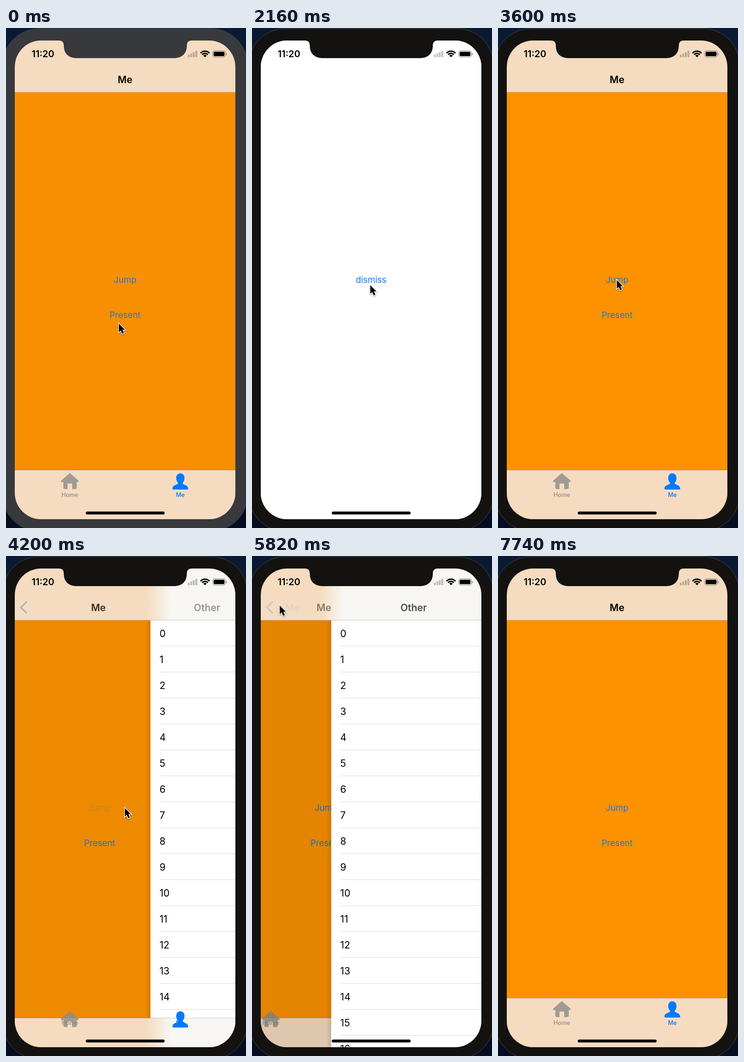
An HTML page with a canvas that plays this animation: 519x1079 px, repeating every 7800 ms.

```html
<!DOCTYPE html>
<html lang="en">
<head>
<meta charset="utf-8">
<style>
html, body { margin: 0; width: 100%; height: 100%; overflow: hidden; background: #0a1730; }
canvas { display: block; }
</style>
</head>
<body>
<canvas id="stage" width="519" height="1079"></canvas>
<script>
const c = document.getElementById('stage').getContext('2d');
const LOOP = 7800, STEP = 60;
const L = 19, T = 27, W = 477, H = 1033, R = L + W, B = T + H, MID = 257.5;
const BLUE = '#087bf2', PALE = '#f8f6f2', PEACH = '#f5dcc0';
const ACTIVE = 1020, PRESENT = 1210, DISMISS = 2620, PUSH = 4127, POP = 5757, SETTLE = 500;
const BAR_TOP = 954, LOW_BAR_TOP = 997;

const house = new Path2D('M136 962Q138 960 140 962L157 977Q158 980 154 980H153V992Q153 995 150 995H143V984Q143 983 142 983H134Q133 983 133 984V995H127Q124 995 124 992V980H121Q118 980 119 977Z');
const person = new Path2D('M377 961C383 961 386 966 386 971C386 976 384 979 382 982C381 986 394 985 394 994Q394 996 391 996H363Q360 996 360 994C360 985 373 986 372 982C370 979 368 976 368 971C368 966 371 961 377 961Z');
const notch = new Path2D('M114 26V27Q125 27 125 38C125 55 135 65 154 65H362C381 65 391 55 391 38Q391 27 402 27V26Z');
const arrow = new Path2D('M0 0V18.5L4.2 14.7L7.5 22L11 20.5L7.8 13.3H13.3Z');

// time, x, y of the pointer tip
const pointer = [
  [0, 244, 638], [700, 244, 638], [1000, 248, 624], [1700, 248, 624], [2300, 257, 544],
  [4250, 257, 544], [4700, 255, 562], [5150, 255, 562], [5460, 60, 107],
  [6200, 60, 107], [6440, 62, -30], [LOOP, 62, -30]
];

let t = 0;

const clamp = v => Math.max(0, Math.min(1, v));

// critically damped spring from 0 to 1
function spring(start) {
  if (t >= start + SETTLE) return 1;
  const x = Math.max(0, t - start) * 0.01826;
  return 1 - (1 + x) * Math.exp(-x);
}

// opacity of a button held from a to b
function press(a, b) {
  return t < a ? 1 : 0.2 + 0.8 * clamp((t - b) / 200);
}

function text(s, x, y, size, color, weight = 400, alpha = 1, align = 'center') {
  c.save();
  c.globalAlpha *= alpha;
  c.font = `${weight} ${size}px Inter, sans-serif`;
  c.textAlign = align;
  c.fillStyle = color;
  c.fillText(s, x, y);
  c.restore();
}

function rect(x, y, w, h, color) {
  c.fillStyle = color;
  c.fillRect(x, y, w, h);
}

function round(x, y, w, h, r, color) {
  c.beginPath();
  c.roundRect(x, y, w, h, r);
  c.fillStyle = color;
  c.fill();
}

// translucent bar over two pages that meet at the pushed page's edge
function barFill(p) {
  const start = R - W * p - 50 * p * p;
  const g = c.createLinearGradient(start, 0, start + 50, 0);
  g.addColorStop(0, PEACH);
  g.addColorStop(1, PALE);
  return g;
}

function tabBar(low, fill) {
  const top = low ? LOW_BAR_TOP : BAR_TOP;
  rect(L, top, W, B - top, fill);
  rect(L, top - 0.5, W, 1, 'rgba(0,0,0,.2)');
  c.save();
  c.translate(0, low ? 21.5 : 0);
  c.fillStyle = 'rgba(140,139,138,.8)';
  c.fill(house);
  c.fillStyle = '#007aff';
  c.fill(person);
  c.restore();
  text('Home', 138, 1012, 12.8, '#918d88', 500);
  text('Me', 377, 1012, 12.8, '#007aff', 500);
}

function mePage(p, low) {
  c.save();
  c.translate(-0.3 * W * p, 0);
  rect(L, 139, W, B - 139, t < ACTIVE ? '#f88f00' : '#fc9200');
  text('Jump', MID, 550, 18.6, '#2379cc', 400, press(4060, 4250));
  text('Present', MID, 626, 18.6, '#2379cc', 400, press(1140, 1270));
  if (t < PUSH || t >= POP) tabBar(low, PEACH);
  c.restore();
}

function otherPage(p) {
  const x = R - W * p;
  rect(L, 139, x - L, B - 139, `rgba(0,0,0,${0.14 * p})`);
  if (p < 1) {
    const g = c.createLinearGradient(x - 10, 0, x, 0);
    g.addColorStop(0, 'rgba(0,0,0,0)');
    g.addColorStop(1, 'rgba(0,0,0,.13)');
    rect(x - 10, 139, 10, B - 139, g);
  }
  rect(x, 139, W, B - 139, '#fff');
  for (let i = 0; i < 17; i++) {
    const y = 139 + 56 * i;
    text(i, x + 19.5, y + 35.5, 21, '#000', 400, 1, 'left');
    rect(x + 19.5, y + 55, W, 1, '#dadadc');
  }
}

function navBar(p) {
  rect(L, T, W, 139 - T, barFill(p));
  rect(L, 138, W, 1, 'rgba(0,0,0,.2)');
  text('Me', MID - 150 * p, 118.5, 21, '#000', 600, 1 - p ** 1.6);
  if (!p) return;
  const q = 1 - p, held = t >= 5620 && t < POP + 150 ? 0.3 : 1;
  text('Other', MID + 288 * q, 118.5, 21, '#000', 600, p);
  text('Me', 68.5 + 60 * q, 118.5, 21, BLUE, 400, clamp((p - 0.5) / 0.5) * held);
  c.save();
  c.globalAlpha = p * held;
  c.strokeStyle = `rgb(${100 * q},122,${255 - 150 * q})`;
  c.lineWidth = 3.4;
  c.stroke(new Path2D('M45 98.5L32 111L45 123.5'));
  c.restore();
}

function statusBar() {
  text('11:20', 80, 63, 20, '#000', 600);
  for (let i = 0; i < 4; i++) {
    const h = 5.5 + 2.8 * i;
    round(393 + 5.5 * i, 63 - h, 4.2, h, 1, 'rgba(0,0,0,.23)');
  }
  c.save();
  c.beginPath();
  c.moveTo(430.3, 63);
  c.arc(430.3, 63, 15, -Math.PI * 0.77, -Math.PI * 0.23);
  c.closePath();
  c.clip();
  c.strokeStyle = c.fillStyle = '#000';
  c.lineWidth = 3;
  for (const r of [13, 8.3]) {
    c.beginPath();
    c.arc(430.3, 63, r, Math.PI, 0);
    c.stroke();
  }
  c.beginPath();
  c.arc(430.3, 63, 5, 0, 7);
  c.fill();
  c.restore();
  c.strokeStyle = 'rgba(0,0,0,.42)';
  c.lineWidth = 1.2;
  c.beginPath();
  c.roundRect(447, 49.2, 27.4, 13.6, 4);
  c.stroke();
  round(449, 51.2, 23.4, 9.6, 2.2, '#000');
  round(475.6, 53.8, 1.7, 4.6, 1, 'rgba(0,0,0,.45)');
}

function cursor() {
  const i = pointer.findIndex(k => k[0] > t);
  const [t0, x0, y0] = pointer[i - 1], [t1, x1, y1] = pointer[i];
  let u = (t - t0) / (t1 - t0);
  u *= u * (3 - 2 * u);
  c.save();
  c.translate(x0 + (x1 - x0) * u, y0 + (y1 - y0) * u);
  c.shadowColor = 'rgba(0,0,0,.35)';
  c.shadowBlur = 3;
  c.shadowOffsetY = 1.5;
  c.strokeStyle = '#fff';
  c.lineWidth = 2.6;
  c.stroke(arrow);
  c.shadowColor = 'transparent';
  c.fillStyle = '#000';
  c.fill(arrow);
  c.restore();
}

function draw(now) {
  t = Math.floor(now % LOOP / STEP) * STEP;
  const p = spring(PUSH) - spring(POP);
  const sheet = spring(PRESENT) - spring(DISMISS);
  const low = t >= PUSH && t < POP + SETTLE;
  const body = t < ACTIVE ? '#38393d' : '#131211';

  const sky = c.createLinearGradient(0, 0, 0, 1079);
  sky.addColorStop(0, '#0b1a33');
  sky.addColorStop(1, '#060d20');
  rect(0, 0, 519, 1079, sky);
  round(-7, 1.5, 529, 1084, 78, body);
  c.strokeStyle = '#41444b';
  c.lineWidth = 1;
  c.stroke();

  c.save();
  c.beginPath();
  c.roundRect(L, T, W, H, 57);
  c.clip();
  mePage(p, low);
  if (p) otherPage(p);
  if (t >= PUSH && t < PUSH + SETTLE) tabBar(true, barFill(p));
  navBar(p);
  if (sheet) {
    const y = B - H * sheet;
    rect(L, y, W, H, '#fff');
    text('dismiss', MID, y + 523, 18.6, BLUE, 400, press(2600, 2700));
  }
  statusBar();
  round(172.5, 1043.5, 170.5, 6.3, 3.1, '#000');
  c.restore();

  c.fillStyle = body;
  c.fill(notch);
  cursor();
}

function tick() {
  draw(performance.now());
  requestAnimationFrame(tick);
}
tick();
</script>
</body>
</html>
```
